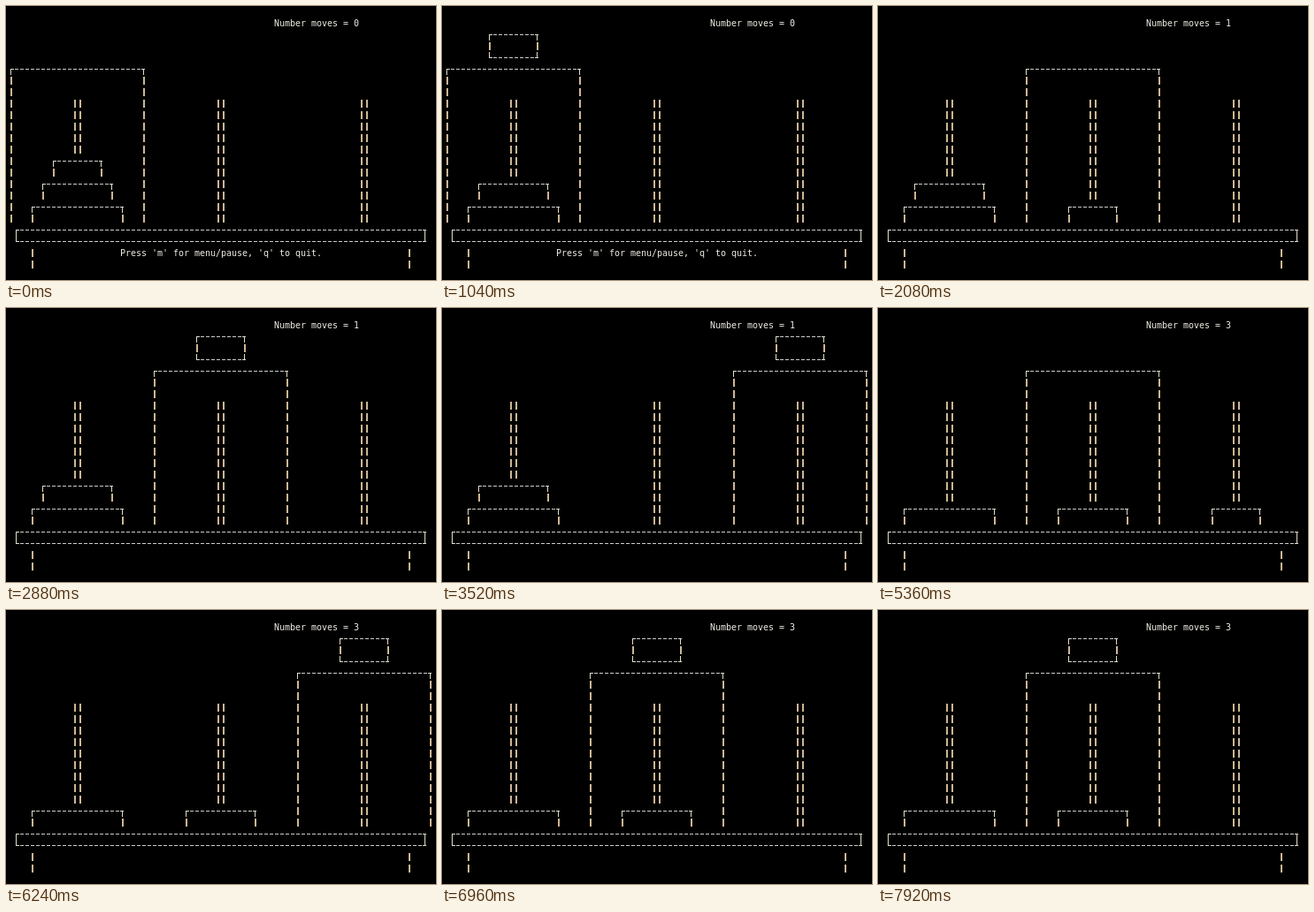
Recreate the animation shown at these times as an HTML page. Size 486 px wide and 310 px high, loop 8 s.

```html
<!DOCTYPE html>
<html lang="en">
<head>
<meta charset="utf-8">
<title>Towers</title>
<style>
  html, body { margin: 0; width: 100%; height: 100%; overflow: hidden; background: #000; }
  svg { display: block; width: 486px; height: 310px; }
  text { font: 10px "DejaVu Sans Mono", "Liberation Mono", monospace; letter-spacing: -0.02px; fill: #f0ece4; }
  #bars { fill: #cdb693; }
  #dashes { fill: #cbcdcb; }
  #corners { fill: #e4dccb; }
</style>
</head>
<body>
<svg viewBox="0 0 486 310" shape-rendering="crispEdges">
  <rect width="486" height="310"/>
  <path id="bars"/>
  <path id="dashes"/>
  <path id="corners"/>
  <text id="count" x="303" y="23"></text>
  <text id="hint" x="129" y="283">Press 'm' for menu/pause, 'q' to quit.</text>
</svg>
<script>
const LOOP = 8000, COLS = 80, ROWS = 22;
const CELL_W = 6, CELL_H = 13, LEFT = 3, TOP = 13;
const PEG_STEP = 27, BASE_ROW = 18;

// Key presses: +1 / -1 moves the selector, 0 lifts or drops a disk.
const KEYS = [
  [720, 0], [1360, 1], [1920, 0],
  [2400, 0], [2960, 1], [3680, 0],
  [3920, -1], [4160, -1], [4480, 0],
  [4880, 1], [5280, 0], [5680, 1], [6000, 0],
  [6720, -1]
];

const el = id => document.getElementById(id);

function stateAt(t) {
  const s = { pegs: [[3, 2, 1], [], []], sel: 0, held: 0, moves: 0 };
  for (const [time, step] of KEYS) {
    if (time > t) break;
    if (step) s.sel += step;
    else if (s.held) {
      s.pegs[s.sel].push(s.held);
      s.held = 0;
      s.moves++;
    } else s.held = s.pegs[s.sel].pop();
  }
  return s;
}

function drawGrid(s) {
  const grid = Array.from({ length: ROWS }, () => Array(COLS).fill(" "));

  const edge = (row, a, b, ends) => {
    grid[row].fill("-", a + 1, b);
    grid[row][a] = ends[0];
    grid[row][b] = ends[1];
  };
  const sides = (from, to, a, b) => {
    for (let r = from; r <= to; r++) grid[r][a] = grid[r][b] = "|";
  };
  const disk = (size, peg, row) => {
    const a = peg * PEG_STEP + 10 - 2 * size;
    const b = peg * PEG_STEP + 15 + 2 * size;
    edge(row, a, b, "┌┐");
    sides(row + 1, row + 1, a, b);
    return [a, b];
  };

  s.pegs.forEach((stack, p) => {
    const x = p * PEG_STEP + 12;
    sides(7, BASE_ROW - 1 - 2 * stack.length, x, x + 1);
    stack.forEach((size, i) => disk(size, p, BASE_ROW - 2 - 2 * i));
  });

  const left = s.sel * PEG_STEP;
  edge(4, left, left + 25, "┌┐");
  sides(5, BASE_ROW - 1, left, left + 25);
  if (s.held) edge(3, ...disk(s.held, s.sel, 1), "└┘");

  edge(BASE_ROW, 1, 78, "┌┐");
  edge(BASE_ROW + 1, 1, 78, "└┘");
  sides(BASE_ROW + 2, BASE_ROW + 3, 4, 75);
  return grid;
}

const box = (x, y, w, h) => `M${x} ${y}h${w}v${h}h${-w}z`;

function paint(grid) {
  let bars = "", dashes = "", corners = "";
  grid.forEach((line, r) => line.forEach((ch, c) => {
    if (ch === " ") return;
    const x = LEFT + c * CELL_W, y = TOP + r * CELL_H;
    if (ch === "|") bars += box(x + 2, y + 2, 2, 9);
    else if (ch === "-") dashes += box(x + 1, y + 6, 4, 1);
    else {
      const right = "┌└".includes(ch), down = "┌┐".includes(ch);
      corners += box(right ? x + 2 : x, y + 6, 4, 1);
      corners += box(x + 2, down ? y + 6 : y, 1, 7);
    }
  }));
  el("bars").setAttribute("d", bars);
  el("dashes").setAttribute("d", dashes);
  el("corners").setAttribute("d", corners);
}

let shown = "";
function render(t) {
  const s = stateAt(t), key = JSON.stringify(s);
  if (key === shown) return;
  shown = key;
  paint(drawGrid(s));
  el("count").textContent = "Number moves = " + s.moves;
  el("hint").style.display = s.moves ? "none" : "";
}

const start = performance.now();
function tick() {
  render((performance.now() - start) % LOOP);
  requestAnimationFrame(tick);
}
render(0);
requestAnimationFrame(tick);
</script>
</body>
</html>
```
